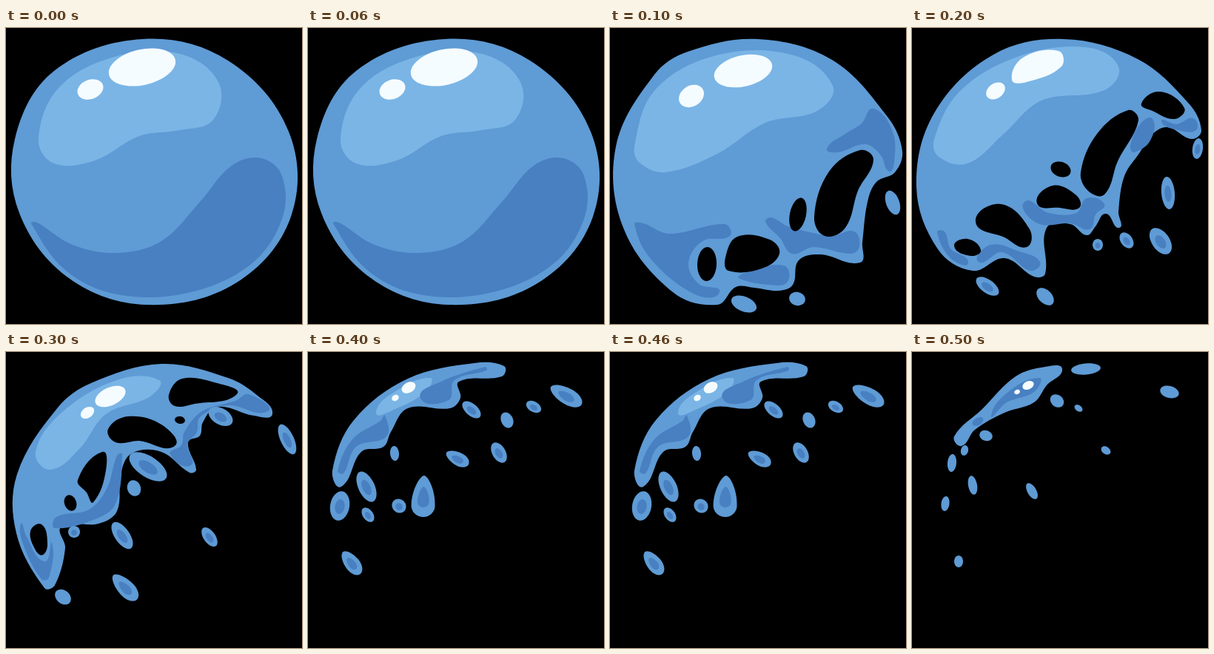
An HTML page with a canvas for the animation above (0.6 s loop, 400x400 px).

```html
<!DOCTYPE html>
<html lang="en">
<head>
<meta charset="utf-8">
<title>Bubble burst</title>
<style>
html, body { margin: 0; width: 100%; height: 100%; overflow: hidden; background: #000; }
canvas { display: block; width: 100%; height: 100%; }
</style>
</head>
<body>
<canvas id="stage" width="400" height="400"></canvas>
<script>
const BASE = '#5f9bd5', LIGHT = '#7ab5e6', DARK = '#4880c2', WHITE = '#f5fcff', HOLE = '#000';
const STEP = 100;
const ctx = document.getElementById('stage').getContext('2d');

// Closed smooth curve; handles follow the neighbours' direction and the segment's length.
function curve(color, ...xy) {
  const n = xy.length / 2;
  const at = i => [xy[(i + n) % n * 2], xy[(i + n) % n * 2 + 1]];
  const dir = i => {
    const [ax, ay] = at(i - 1), [bx, by] = at(i + 1);
    const len = Math.hypot(bx - ax, by - ay) || 1;
    return [(bx - ax) / len, (by - ay) / len];
  };
  ctx.fillStyle = color;
  ctx.beginPath();
  ctx.moveTo(...at(0));
  for (let i = 0; i < n; i++) {
    const [x0, y0] = at(i), [x1, y1] = at(i + 1);
    const [u0, v0] = dir(i), [u1, v1] = dir(i + 1);
    const h = Math.hypot(x1 - x0, y1 - y0) * 0.35;
    ctx.bezierCurveTo(x0 + u0 * h, y0 + v0 * h, x1 - u1 * h, y1 - v1 * h, x1, y1);
  }
  ctx.fill();
}

// Oval turned by deg; taper narrows its rear end.
function oval(color, x, y, rx, ry, deg = 0, taper = 0) {
  const k = 0.55, m = taper * rx, back = rx + m, front = rx - m;
  ctx.save();
  ctx.translate(x, y);
  ctx.rotate(deg * Math.PI / 180);
  ctx.fillStyle = color;
  ctx.beginPath();
  ctx.moveTo(-rx, 0);
  ctx.bezierCurveTo(-rx, -k * ry * (1 - taper), m - k * back, -ry, m, -ry);
  ctx.bezierCurveTo(m + k * front, -ry, rx, -k * ry, rx, 0);
  ctx.bezierCurveTo(rx, k * ry, m + k * front, ry, m, ry);
  ctx.bezierCurveTo(m - k * back, ry, -rx, k * ry * (1 - taper), -rx, 0);
  ctx.fill();
  ctx.restore();
}

const drop = (...shape) => oval(BASE, ...shape);

// Drop with a dark core.
function cored(x, y, rx, ry, deg, taper) {
  drop(x, y, rx, ry, deg, taper);
  oval(DARK, x, y + 1, rx * 0.5, ry * 0.5, deg, taper);
}

function whole() {
  curve(BASE, 185,15, 300,44, 382,140, 385,255, 310,345, 190,374, 85,338, 18,250, 12,150, 65,58);
  curve(LIGHT, 44,150, 72,80, 150,38, 235,35, 287,73, 280,124, 235,138, 180,146, 120,179, 65,183);
  curve(DARK, 34,264, 42,263, 90,293, 150,304, 210,288, 262,235, 305,186, 345,176, 373,200,
    373,258, 330,320, 245,358, 150,360, 80,327);
  oval(WHITE, 184, 53, 46, 24, -13);
  oval(WHITE, 114, 83, 18, 13, -20);
}

function torn() {
  curve(BASE, 200,15, 300,43, 375,120, 395,166, 385,195, 360,208, 348,235, 341,290, 338,317,
    285,306, 255,314, 247,347, 228,355, 195,351, 170,350, 145,374, 85,357, 18,270, 8,160, 60,63, 105,32);
  curve(LIGHT, 33,160, 60,85, 140,38, 245,36, 301,78, 280,112, 210,128, 145,170, 75,195, 40,182);
  oval(WHITE, 180, 58, 40, 21, -13);
  oval(WHITE, 110, 92, 18, 14, -32);
  curve(DARK, 293,163, 318,143, 340,129, 356,109, 382,140, 384,182, 377,194, 366,172, 345,157, 308,168);
  curve(DARK, 33,265, 45,264, 80,278, 155,265, 162,281, 125,288, 106,318, 120,346, 148,357, 115,360, 55,312);
  curve(DARK, 210,262, 218,256, 240,268, 270,276, 300,281, 330,275, 337,296, 325,305, 275,296, 246,305, 230,284);
  curve(DARK, 174,338, 182,331, 235,321, 240,343, 215,347);
  curve(HOLE, 276,255, 296,194, 338,165, 356,178, 335,220, 318,270, 290,281);
  curve(HOLE, 156,310, 172,282, 216,286, 229,305, 205,325, 160,328);
  oval(HOLE, 254, 252, 23, 11, -78);
  oval(HOLE, 131, 319, 23, 13, 92);
  drop(181, 373, 18, 10, 22);
  drop(253, 366, 11, 9, 15);
  drop(382, 236, 17, 9, 70);
}

function ragged() {
  curve(BASE, 205,15, 305,42, 374,102, 391,138, 378,150, 345,134, 323,145, 308,168, 287,200,
    279,248, 280,270, 262,251, 248,268, 236,280, 214,265, 182,270, 180,332, 165,336, 125,311,
    82,328, 35,299, 6,215, 30,115, 110,36);
  curve(LIGHT, 30,150, 65,85, 145,38, 235,26, 279,52, 260,84, 175,98, 125,142, 75,183, 36,174);
  curve(WHITE, 135,70, 150,40, 198,31, 202,52, 155,73);
  oval(WHITE, 113, 85, 14, 10, -35);
  curve(DARK, 295,160, 308,130, 325,123, 322,152, 300,168);
  curve(DARK, 337,126, 358,130, 380,122, 384,138, 360,138);
  curve(DARK, 152,235, 185,250, 222,250, 236,230, 260,238, 248,252, 240,272, 215,264, 170,264);
  curve(DARK, 90,316, 106,293, 145,302, 173,316, 160,328, 122,303);
  curve(DARK, 34,276, 44,275, 52,298, 76,317, 52,311);
  curve(HOLE, 310,102, 335,86, 368,108, 355,123, 325,112);
  curve(HOLE, 228,195, 250,143, 292,111, 306,125, 278,180, 260,225, 238,220);
  curve(HOLE, 169,237, 190,213, 222,226, 226,243, 200,243);
  curve(HOLE, 86,262, 120,238, 159,272, 155,296, 125,283);
  curve(HOLE, 57,295, 75,285, 93,300, 80,308);
  oval(HOLE, 201, 191, 14, 10, 20);
  cored(102, 349, 18, 9, 36);
  drop(180, 363, 14, 9, 45);
  cored(251, 293, 8, 7, 90);
  cored(290, 287, 12, 8, 55);
  cored(336, 288, 20, 12, 55);
  cored(346, 223, 22, 9, 85);
  cored(386, 163, 14, 7, 98);
}

function crescent() {
  curve(BASE, 210,16, 300,35, 340,59, 360,84, 335,86, 285,74, 266,95, 262,113, 246,122, 257,159,
    248,163, 210,135, 170,137, 155,165, 150,215, 125,232, 75,236, 80,265, 66,315, 52,319,
    14,245, 15,165, 70,75, 115,42);
  curve(LIGHT, 40,135, 75,82, 150,38, 207,38, 195,60, 135,84, 100,130, 60,159);
  oval(WHITE, 141, 60, 22, 12, -25);
  oval(WHITE, 110, 82, 10, 7, -35);
  curve(DARK, 265,80, 310,66, 328,57, 354,80, 300,72, 262,88, 258,108, 245,125, 250,153, 222,138, 237,126, 241,108);
  curve(DARK, 150,140, 157,138, 148,205, 120,226, 66,238, 68,223, 112,213, 136,185);
  curve(DARK, 20,232, 28,250, 52,283, 62,258, 58,305, 48,307, 24,262);
  curve(HOLE, 220,58, 238,36, 285,42, 312,57, 255,70, 228,73);
  curve(HOLE, 138,104, 165,87, 210,98, 228,127, 180,120, 148,122);
  curve(HOLE, 97,173, 130,135, 135,160, 118,203, 109,190);
  curve(HOLE, 33,242, 48,233, 56,258, 50,274, 40,268);
  oval(HOLE, 87, 204, 8, 11, -20);
  oval(HOLE, 235, 92, 7, 5, 10);
  cored(192, 155, 29, 14, 33);
  drop(173, 184, 11, 9, 70);
  cored(92, 243, 8, 8);
  cored(290, 87, 18, 11, 30);
  cored(380, 118, 22, 9, 65);
  cored(157, 248, 21, 10, 55);
  cored(275, 250, 15, 8, 55);
  cored(161, 318, 23, 11, 46, 0.2);
  drop(77, 331, 12, 9, 40);
}

function sliver() {
  curve(BASE, 265,19, 262,33, 204,40, 206,62, 192,76, 135,76, 112,108, 102,128, 72,135, 45,182,
    33,160, 62,92, 135,36, 225,15);
  curve(LIGHT, 92,82, 120,52, 165,35, 160,53, 118,77);
  oval(WHITE, 136, 48, 10, 7, -30);
  oval(WHITE, 118, 62, 5, 4, -30);
  curve(DARK, 152,62, 180,40, 240,20, 241,25, 198,38, 190,65);
  curve(DARK, 40,160, 60,118, 98,93, 104,86, 106,114, 65,128, 48,164);
  cored(221, 78, 15, 8, 40);
  drop(269, 92, 11, 8, 65);
  cored(305, 74, 11, 7, 30);
  cored(349, 59, 24, 11, 30, 0.15);
  cored(258, 136, 15, 9, 60);
  cored(202, 144, 17, 9, 28, 0.2);
  drop(117, 137, 10, 6, 85);
  cored(79, 182, 22, 11, 65);
  cored(43, 208, 20, 13, 100);
  cored(81, 220, 11, 7, 55);
  cored(123, 208, 10, 9, 40);
  cored(156, 195, 28, 16, 92, 0.45);
  cored(59, 285, 19, 10, 52, 0.15);
}

function droplets() {
  curve(BASE, 203,23, 182,45, 165,68, 125,82, 85,105, 67,127, 57,114, 95,77, 140,33, 180,20);
  curve(DARK, 107,86, 130,54, 172,35, 165,54, 128,68);
  oval(DARK, 89, 94, 8, 5, -30);
  oval(WHITE, 157, 45, 8, 5.5, -25);
  oval(WHITE, 142, 54, 4, 3, -20);
  drop(235, 23, 20, 7.5, -5);
  drop(348, 54, 13, 8, 15);
  drop(196, 66, 10, 8, 40);
  drop(225, 76, 6, 4, 35);
  drop(262, 133, 7, 5, 35);
  drop(100, 113, 9, 7, 20);
  drop(71, 133, 5, 7, 15);
  drop(54, 150, 6, 12, 5);
  drop(82, 180, 13, 6, 80);
  drop(45, 205, 5.5, 10, 8);
  drop(162, 188, 12, 6, 60);
  drop(63, 283, 6, 8);
}

const poses = [whole, torn, ragged, crescent, sliver, droplets];

let start = null;
function tick(now) {
  if (start === null) start = now;
  ctx.fillStyle = HOLE;
  ctx.fillRect(0, 0, 400, 400);
  poses[Math.floor((now - start) / STEP) % poses.length]();
  requestAnimationFrame(tick);
}
requestAnimationFrame(tick);
</script>
</body>
</html>
```
